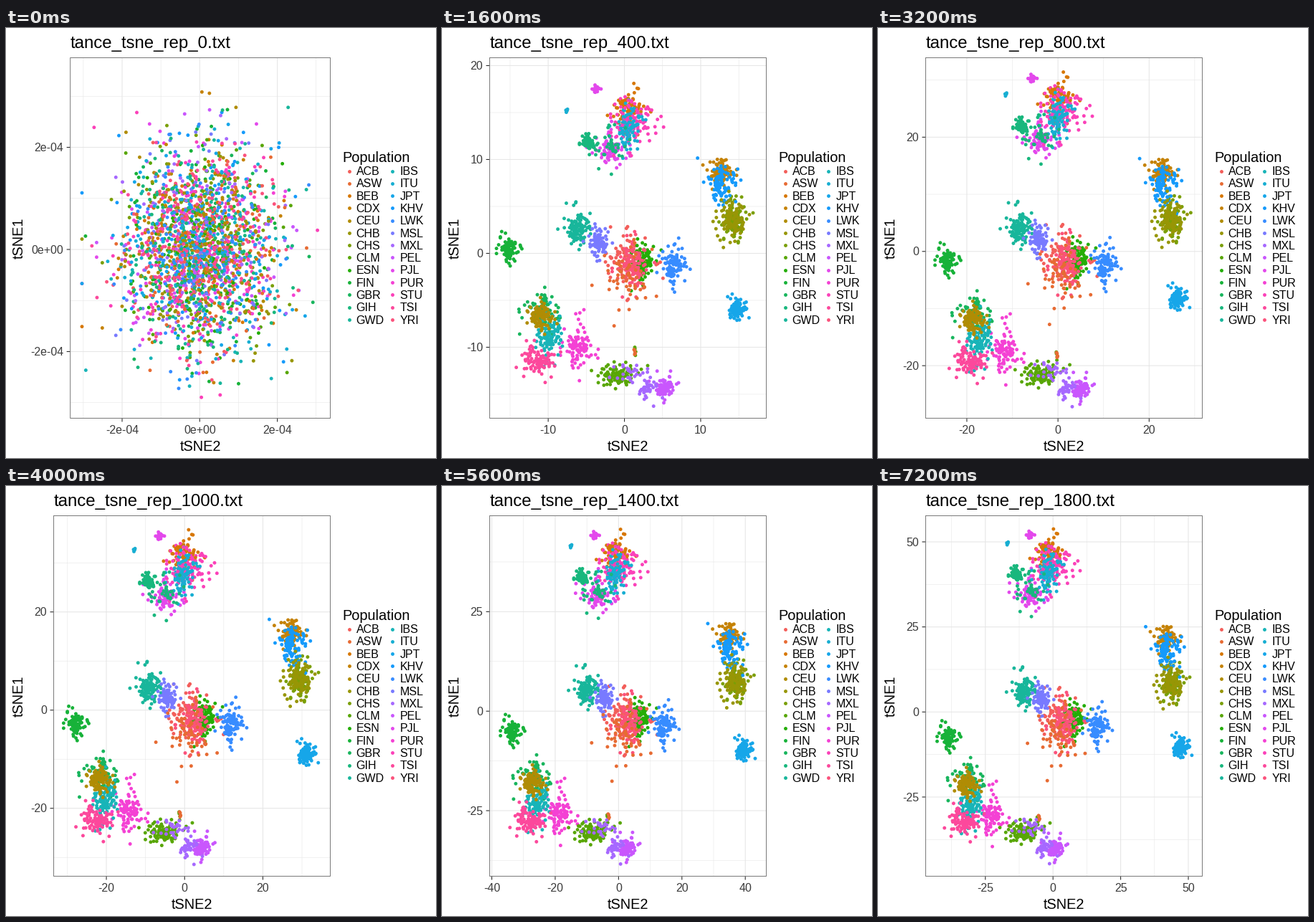
These frames come from a looping animation (600 by 600 pixels, 8000 ms). A matplotlib script:

```python
import numpy as np
import matplotlib.pyplot as plt
from matplotlib.animation import FuncAnimation

PT = 0.72  # points per pixel at 100 dpi
TOP, BOTTOM, RIGHT = 41.5, 544.5, 452.5
DOT = (4.9 * PT) ** 2
FONT = "Liberation Sans"
GRID, INK, TICK_TEXT, BORDER = "#e6e6e6", "#262626", "#3c3c3c", "#7a7a7a"

POPS = ("ACB ASW BEB CDX CEU CHB CHS CLM ESN FIN GBR GIH GWD "
        "IBS ITU JPT KHV LWK MSL MXL PEL PJL PUR STU TSI YRI").split()
DRAW_ORDER = ("GBR FIN CHS PUR CDX CLM IBS PEL PJL KHV ACB GWD ESN "
              "BEB MSL STU ITU CEU YRI CHB JPT LWK ASW MXL TSI GIH").split()
STEPS = range(0, 2000, 200)

# Pixels per data unit at a few steps; the axes zoom out between them
ZOOM_STEPS = (200, 400, 600, 1000, 1800)
ZOOM_X = (25, 10.64, 7.74, 5.46, 3.776)
ZOOM_Y = (27.4, 13.1, 9.69, 6.85, 4.747)


def hue_color(i, n=26, lum=65, chroma=100):
    """Evenly spaced LUV hue, shifted to a gamma 1.8 display space."""
    h = np.radians(15 + 360 * i / n)
    y = ((lum + 16) / 116) ** 3
    u = chroma * np.cos(h) / (13 * lum) + 0.1978
    v = chroma * np.sin(h) / (13 * lum) + 0.4683
    x = 9 * y * u / (4 * v)
    z = y * (12 - 3 * u - 20 * v) / (4 * v)
    to_rgb = [[3.2405, -1.5371, -0.4985],
              [-0.9693, 1.8760, 0.0416],
              [0.0556, -0.2040, 1.0572]]
    to_display = [[0.972, 0.027, 0], [-0.022, 1.058, -0.034], [0, 0.002, 0.998]]
    rgb = np.clip(np.dot(to_rgb, [x, y, z]), 0, 1)
    return np.clip(np.dot(to_display, rgb), 0, 1) ** (1 / 1.8)


COLORS = {pop: hue_color(i) for i, pop in enumerate(POPS)}
rng = np.random.default_rng(4)
dots = []  # (draw rank, population, row of final x, y, offset, drift, early)


def blob(pop, x, y, drift, spread=(8.5, 12), n=98, early=(1, 1)):
    """Final cluster at x, y; drift is how far away it sat at step 600."""
    unit = np.clip(0.82 * rng.standard_t(6, (n, 2)), -3, 3)
    rank = DRAW_ORDER.index(pop) + rng.uniform(0, 3, n)
    for r, offset in zip(rank, unit * spread):
        dots.append((r, pop, np.array([(x, y), offset, drift, early], float)))


EUROPE, AMERICA, AFRICA = (12, -13), (42, -1), (6, -4)
SOUTH_ASIA, EAST_ASIA = (18, 6), (-8, -15)
DENSE = (0.35, 0.5)

blob("FIN", 99, 350, (-2, -35), (5.5, 7.5), early=(0.35, 0.7))
blob("GBR", 127, 409, EUROPE, (10, 10))
blob("CEU", 123, 415, EUROPE, (9, 10))
blob("IBS", 130, 443, (17, -12), (11, 14))
blob("TSI", 118, 468, (12, -4), (10, 9.5))

blob("PUR", 156, 460, (25, -12), (9, 16))
blob("CLM", 204, 482, (33, 1), (12, 8))
blob("MXL", 232, 503, AMERICA, (7, 8), 40)
blob("MXL", 211, 475, (38, 4), (8, 8), 24)
blob("PEL", 246, 505, (48, -3), (6.2, 6.8), 85)
blob("CLM", 222, 466, (36, -13), (2, 5), 4)
blob("ASW", 225, 463, (34, -9), (1, 2), 5)

blob("ACB", 256, 327, AFRICA, (14, 20))
blob("ASW", 251, 350, AFRICA, (15, 23), 56)
blob("YRI", 262, 330, AFRICA, (9, 14), 108)
blob("ESN", 275, 326, AFRICA, (7.5, 12.5))
blob("LWK", 305, 340, (14, -7), (7.5, 13))
blob("MSL", 228, 299, (-5, -3), (6.5, 10), 85, (0.8, 0.6))
blob("GWD", 203, 287, (-9, -10), (8, 11.5), 113)

blob("BEB", 239, 93, SOUTH_ASIA, (9, 11), 86)
blob("STU", 240, 113, SOUTH_ASIA, (14, 14), 102)
blob("ITU", 237, 120, SOUTH_ASIA, (7.5, 13))
blob("ITU", 181, 79, (-3, 17), (1.3, 1.3), 4)
blob("GIH", 194, 123, (10, 19), (4, 5.5), 66, (0.9, 0.3))
blob("GIH", 213, 145, SOUTH_ASIA, (8, 17), 37)
blob("PJL", 210, 151, SOUTH_ASIA, (9, 12), 76)
blob("PJL", 213, 70, (4, 3), (2.8, 3), 20, DENSE)

blob("CDX", 401, 213, EAST_ASIA, (7, 8))
blob("KHV", 402, 231, EAST_ASIA, (9.5, 13))
blob("CHS", 411, 277, (-1, -11), (8, 12), 105)
blob("CHB", 409, 275, (-1, -11), (8, 12), 103)
blob("JPT", 422, 364, (-6, 18), (5.3, 6.7), 104, DENSE)

dots.sort(key=lambda d: d[0])
point_colors = [COLORS[pop] for _, pop, _ in dots]
home, offsets, drifts, early = np.stack([row for *_, row in dots], axis=1)
start = (270.3, 309) + np.clip(rng.normal(size=home.shape), -3.1, 3.1) * (53, 71)


def place(step, final, drift, offset=0, tight=1):
    """Screen position: steady drift in log time, squeezed early on."""
    u = np.log(step / 600) / np.log(3)
    squeeze = max(0, (600 - step) / 400) ** 2
    size = np.interp(u, [0, 1], [1.12, 1]) * (1 + (np.array(tight) - 1) * squeeze ** 2)
    p = np.array(final) + (1 - u) * np.array(drift) + size * offset
    return p + squeeze * ((-10, 60) - p * (0, 0.12))


def axis_map(step):
    """Screen position of the data origin, and pixels per unit."""
    if step == 0:
        return (270.3, 309), (541500, 712500)
    zoom = [np.exp(np.interp(np.log(step), np.log(ZOOM_STEPS), np.log(z)))
            for z in (ZOOM_X, ZOOM_Y)]
    return place(step, (244.2, 315.3), (9.4, -4.8)), zoom


def nice_gap(span):
    """Tick distance for an axis of the given length."""
    base = 10.0 ** np.floor(np.log10(span))
    rules = ((1.1, 0.25), (1.7, 0.4), (3, 0.5), (5.5, 1), (9, 2), (10, 2.5))
    return base * next(gap for limit, gap in rules if span / base < limit)


def ticks(zero, scale, gap, low, high, shift=0.0):
    """(value, place) of each tick multiple lying between low and high."""
    values = (np.arange(-6, 7) + shift) * gap
    return [(v, zero + v * scale) for v in values if low < zero + v * scale < high]


def label(value, step):
    return f"{value:.0e}" if step == 0 else f"{value:g}"


fig = plt.figure(figsize=(6, 6), dpi=100, facecolor="white")
ax = fig.add_axes([0, 0, 1, 1])


def text(x, y, s, size, **kw):
    ax.text(x, y, s, fontsize=size * PT, family=FONT, va="baseline", **kw)


def line(xs, ys, color, width, z):
    ax.plot(xs, ys, color=color, lw=width * PT, zorder=z,
            solid_capstyle="butt", snap=False)


def draw_panel(step):
    (x0, y0), (sx, sy) = axis_map(step)
    ygap = nice_gap((BOTTOM - TOP) / sy)
    ymajor = ticks(y0, -sy, ygap, TOP, BOTTOM)
    names = [label(v, step) for v, _ in ymajor]
    # The widest label pushes the panel to the right
    left = 43.4 + max(8.9 * len(s) - 3.57 * s.count("-") for s in names)
    xgap = nice_gap((RIGHT - left) / sx)
    xmajor = ticks(x0, sx, xgap, left, RIGHT)

    for shift, width in ((0.5, 0.55), (0, 1.07)):
        for _, x in ticks(x0, sx, xgap, left, RIGHT, shift):
            line([x, x], [TOP, BOTTOM], GRID, width, 1 + width)
        for _, y in ticks(y0, -sy, ygap, TOP, BOTTOM, shift):
            line([left, RIGHT], [y, y], GRID, width, 1 + width)
    for v, x in xmajor:
        line([x, x], [BOTTOM, BOTTOM + 5], INK, 1.07, 5)
        text(x, 566, label(v, step), 16, ha="center", color=TICK_TEXT)
    for (_, y), name in zip(ymajor, names):
        line([left - 5, left], [y, y], INK, 1.07, 5)
        text(left - 9.3, y + 5.7, name, 16, ha="right", color=TICK_TEXT)
    line([left, RIGHT, RIGHT, left, left], [TOP, TOP, BOTTOM, BOTTOM, TOP], BORDER, 1, 6)

    text(left, 28, f"tance_tsne_rep_{step}.txt", 24)
    text((left + RIGHT) / 2, 590, "tSNE2", 20, ha="center")
    text(24, 293, "tSNE1", 20, ha="center", rotation=90, rotation_mode="anchor")


def draw_legend():
    text(469.5, 187, "Population", 20)
    for i, pop in enumerate(POPS):
        col, row = divmod(i, 13)
        y = 199.5 + 17.28 * row
        ax.scatter([478.5 + 60 * col], [y], s=DOT, color=[COLORS[pop]], linewidths=0)
        text(488.5 + 61 * col, y + 5.7, pop, 16)


def draw(i):
    step = STEPS[i]
    ax.clear()
    ax.set(xlim=(0, 600), ylim=(600, 0))
    ax.axis("off")
    draw_panel(step)
    points = place(step, home, drifts, offsets, early) if step else start
    ax.scatter(*points.T, s=DOT, c=point_colors, linewidths=0, zorder=4)
    draw_legend()
    return []


anim = FuncAnimation(fig, draw, frames=len(STEPS), interval=800,
                     init_func=lambda: [], repeat=True)
plt.show()
```
